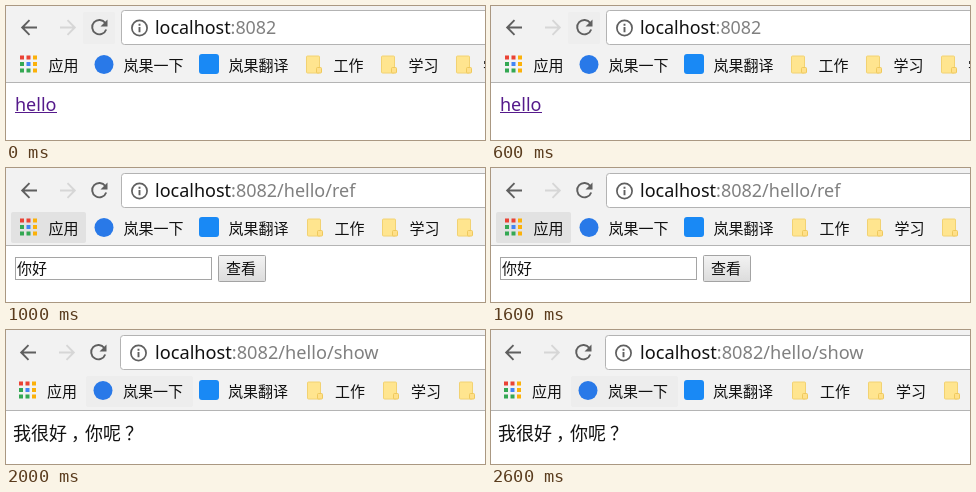
Animation, 479 px wide and 134 px high, one loop 3000 ms. Source, as an HTML page:

```html
<!DOCTYPE html>
<html lang="zh-CN">
<head>
<meta charset="utf-8">
<title>localhost:8082</title>
<style>
  html, body { margin: 0; width: 100%; height: 100%; overflow: hidden; background: #fff; }
  svg { display: block; width: 479px; height: 134px; }
  text { font: 15px "Noto Sans CJK SC", "Noto Sans CJK", sans-serif; fill: #111; white-space: pre; }
  .latin { font: 18px "Noto Sans", "Open Sans", sans-serif; }
  .page { font-size: 18px; }
  .icon { fill: none; stroke: #5f5f5f; stroke-width: 1.9; }
</style>
</head>
<body>
<svg id="stage" viewBox="0 0 479 134">
  <linearGradient id="button" x2="0" y2="1">
    <stop stop-color="#f3f3f3"/>
    <stop offset="1" stop-color="#dcdcdc"/>
  </linearGradient>
</svg>
<script>
const STEP = 1000;
const stage = document.getElementById('stage');

const rect = (x, y, w, h, fill, extra = '') =>
  `<rect x="${x}" y="${y}" width="${w}" height="${h}" fill="${fill}" ${extra}/>`;
const text = (x, y, str, extra = '') => `<text x="${x}" y="${y}" ${extra}>${str}</text>`;

const folder = (x, y) =>
  rect(x, y, 13, 17, '#ffe58f', 'rx="1" stroke="#f2d272"') +
  rect(x + 10, y + 11.5, 5, 5.5, '#ffe08a', 'rx="1" stroke="#efc95c"');

function navigation(x, y) {
  return `<g class="icon" transform="translate(${x} ${y})">
    <path d="M31 0H16M23.500-7.300L16.200 0l7.300 7.300"/>
    <path d="M54 0h15M61.500-7.300L68.800 0l-7.300 7.300" stroke="#d6d6d6"/>
    <path d="M99.300-4.500A7.200 7.200 0 1 0 100.200 2"/>
    <path d="M101.500-8v7h-7z" fill="#5f5f5f" stroke="none"/>
    <circle cx="133.500" cy="0.500" r="7.600" stroke-width="1.700"/>
    <path d="M133.500-.5v5.200M133.500-3.800v2"/>
  </g>`;
}

function appsGrid(x, y) {
  const red = '#ea4335', yellow = '#fbb10a', green = '#34a853', blue = '#4285f4';
  return [red, red, yellow, green, blue, yellow, green, green, yellow]
    .map((c, i) => rect(x + i % 3 * 6.5, y + Math.floor(i / 3) * 6.5, 4, 4, c)).join('');
}

function browser({ x, bar, y, line, size, path, labels, folders, hover, content }) {
  const [apps, search, translate, work, study] = labels;
  return rect(0, 0, 479, 134, '#fff') +
    rect(0, 0, 479, line, '#f2f2f2') +
    rect(0, line, 479, 1, '#b4b4b4') +
    hover +
    rect(115.5 + x, 4.5 + bar, 380, 34, '#fff', 'rx="3" stroke="#b3b3b3"') +
    navigation(x, 21.5 + bar) +
    text(149, 27.5 + bar, `localhost<tspan fill="#808080">:8082${path}</tspan>`,
      `class="latin" style="font-size:${size}px"`) +
    appsGrid(14 + x, 49.5 + y) +
    `<circle cx="${98 + x}" cy="${58.5 + y}" r="9.500" fill="#2979e8"/>` +
    rect(193, 48 + y, 20, 20, '#1989f5', 'rx="3"') +
    text(apps, 65 + y, '应用') +
    text(search, 65 + y, '岚果一下') +
    text(translate, 65 + y, '岚果翻译') +
    text(work, 65 + y, '工作') +
    text(study, 65 + y, '学习') +
    folders.map(fx => folder(fx, 50 + y)).join('') +
    content;
}

const scenes = [
  browser({
    x: 0, bar: 0, y: 0, line: 76, size: 17.9, path: '',
    labels: [42.5, 117.5, 222.5, 327.5, 402.5], folders: [300.5, 375.5, 450.5],
    hover: rect(77, 6, 32, 32, '#eeeeee', 'rx="2"'),
    content: text(477, 65, '学') +
      text(9, 105, 'hello', 'class="latin" style="fill:#551a8b"') +
      rect(9, 106, 42, 1, '#551a8b')
  }),
  browser({
    x: 0, bar: 1, y: 1, line: 77, size: 18, path: '/hello/ref',
    labels: [42.5, 117.5, 222.5, 328.5, 403.5], folders: [301.5, 376.5, 451.5],
    hover: rect(5, 44, 75, 31, '#e2e2e2', 'rx="2"'),
    content: rect(9.5, 89.5, 196, 22, '#fff', 'stroke="#a5a5a5"') +
      text(11, 106, '你好') +
      rect(212.5, 87.5, 47, 26, 'url(#button)', 'stroke="#a3a3a3" rx="1"') +
      text(220, 106, '查看', 'font-weight="500"')
  }),
  browser({
    x: -1, bar: 1, y: 2, line: 80, size: 18.2, path: '/hello/show',
    labels: [41, 117, 222, 329, 405], folders: [301.5, 377.5, 453.5],
    hover: rect(80, 46, 107, 31, '#ededed', 'rx="2"'),
    content: text(7, 110, '我很好，你呢？', 'class="page" dx="0 0 0 4 -4 0 4"')
  })
];

scenes.forEach((markup, i) => {
  const layer = document.createElementNS('http://www.w3.org/2000/svg', 'g');
  layer.innerHTML = markup;
  stage.append(layer);
  const frames = [0, 1, 2, 3].map(k => ({
    opacity: Math.min(k, 2) === i ? 1 : 0,
    offset: k / 3,
    easing: 'step-end'
  }));
  layer.animate(frames, { duration: STEP * scenes.length, iterations: Infinity });
});
</script>
</body>
</html>
```
